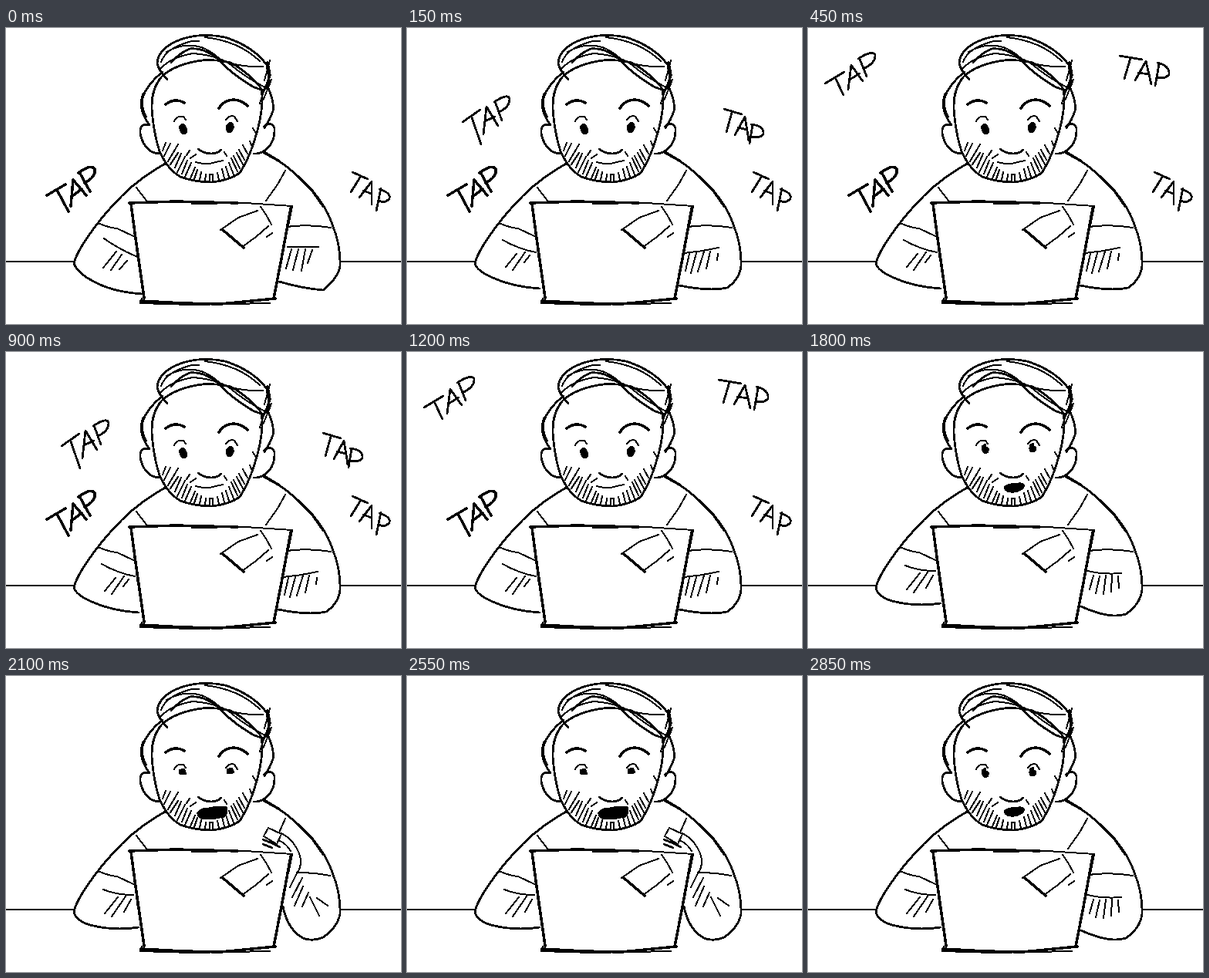
An HTML page that plays this animation: 512x384 px, repeating every 3 s.

```html
<!DOCTYPE html>
<html lang="en">
<head>
<meta charset="utf-8">
<title>Typing</title>
<style>
html, body { margin: 0; width: 100%; height: 100%; overflow: hidden; background: #fff; }
svg { display: block; width: 100%; height: 100%; }
path { fill: none; stroke: #000; stroke-width: 2.8; stroke-linecap: round; stroke-linejoin: round; shape-rendering: crispEdges; }
.thin { stroke-width: 2; }
.bold { stroke-width: 3.5; }
.ink { fill: #000; stroke-width: 1; }
g[id] { display: none; }
g.on { display: inline; }
</style>
</head>
<body>
<svg viewBox="0 0 512 384">
  <!-- table -->
  <path class="thin" d="M0 302.5H88M433 302.5H512"/>

  <!-- hair -->
  <path d="M209 67Q199 57 196 46Q197 28 221 17Q249 5 284 12Q321 24 338 48L342 73"/>
  <path class="thin" d="M201 44Q207 28 231 20Q240 16 250 17M208 31Q230 19 249 24Q261 26 277 40Q298 51 333 50"/>
  <path d="M214 45Q224 33 238 27Q256 25 273 39Q292 59 315 73Q324 79 335 81"/>
  <path class="thin" d="M201 52Q214 38 242 33Q270 35 288 45Q310 64 334 76M258 12Q302 17 329 43"/>
  <path class="bold" d="M339 45L342 61L337 78"/>
  <path class="thin" d="M342 42L335 68M344 67L334 92M336 76L329 98"/>
  <path d="M203 57Q184 71 175 94Q174 110 186 126M340 78Q348 96 346 108Q342 119 335 130"/>
  <path class="bold" d="M178 86L176 93L177 106L181 115"/>

  <!-- face -->
  <path d="M238 45Q212 52 201 64Q188 80 189 105Q191 135 199 160Q210 184 226 193Q244 200 268 200Q291 197 303 188Q314 171 321 149Q331 120 332 96Q333 84 329 76Q311 55 291 45Q264 38 238 45"/>
  <path d="M186 126Q173 122 174 137Q177 153 188 160Q195 164 200 162M334 128Q345 120 348 130Q349 145 340 155Q331 164 321 163"/>
  <path class="bold" d="M207 99Q219 90 231 97M276 104Q282 94 294 93Q305 93 313 101"/>
  <path d="M249 157Q257 163 266 163Q274 163 279 158"/>
  <path class="thin" d="M203 159L207 149M205 166L213 150M210 173L223 151M213 177L223 162M219 181L227 163M222 187L232 167M228 189L235 172M232 193L240 175M239 195L245 181M244 196L248 184M251 197L253 187M258 198L259 190M264 199V190H268V200M276 197L274 188M283 195L280 183M289 193L285 180M295 190L289 175M300 186L292 169M303 182L295 166M307 177L299 162M309 171L302 158M313 163L307 152M319 154L316 147M325 138L320 130M286 166L283 161M234 165L238 159M239 169L246 164"/>

  <!-- shoulders -->
  <path d="M208 175Q174 194 151 217Q121 247 100 280Q89 298 88 306M335 161Q363 176 385 199Q413 225 423 255Q434 282 433 309"/>
  <path class="bold" d="M335 162L353 172M379 193L397 211L411 231"/>
  <path class="thin" d="M169 207L182 224M119 253Q133 259 144 260L165 270"/>

  <!-- laptop -->
  <path class="bold" d="M160 227L220 225L300 227M162 228L168 273L179 350M369 234L358 294L347 351M175 354L230 357L278 358L349 351"/>
  <path class="thin" d="M241 228L310 227L371 231L366 256M176 351L174 357L240 359L342 357M163 238L171 302"/>
  <path class="thin" d="M278 262L301 246L326 237M306 284L324 271L340 257M330 232L337 242L344 255M338 271L345 266"/>
  <path class="bold" d="M281 262L308 285"/>

  <!-- lids, eyes and mouths -->
  <g id="lids"><path class="thin" d="M218 121Q222 113 230 115L233 119M285 119Q291 112 296 115L300 121"/></g>
  <g id="look"><path class="ink" d="M228 124Q233 125 235 133Q234 138 229 138Q224 134 225 127ZM290 122Q296 122 295 130Q293 136 288 136Q284 132 286 126Z"/></g>
  <g id="stare"><path class="ink" d="M225 122L230 119L231 123L234 125Q235 131 230 132Q225 131 225 122ZM288 120L292 118L293 122L296 124Q296 130 290 130Q285 128 288 120Z"/></g>
  <g id="gape"><path class="ink" d="M224 122L231 120L234 127H225ZM286 121L293 119L296 125Q291 128 286 126Z"/></g>
  <g id="shut"><path d="M219 122Q227 128 234 123M285 123Q292 128 299 122"/></g>
  <g id="smile"><path class="thin" d="M246 174Q260 178 272 174L281 172"/></g>
  <g id="flat"><path class="thin" d="M257 175Q267 176 276 173"/></g>
  <g id="small"><path class="ink" d="M262 173Q267 169 273 172Q272 177 266 177Q262 176 262 173Z"/></g>
  <g id="round"><path class="ink" d="M262 173Q267 169 273 172Q274 179 267 180Q262 179 262 173Z"/></g>
  <g id="open"><path class="ink" d="M254 175Q260 170 268 171Q278 168 281 173Q278 181 267 182Q255 183 254 175Z"/></g>
  <g id="wide"><path class="ink" d="M248 177Q252 171 263 171Q275 168 286 170Q289 178 283 183Q270 186 258 186Q247 185 248 177Z"/></g>

  <!-- left arm -->
  <g id="leftA">
    <path d="M88 306Q94 319 114 329Q137 342 176 345"/>
    <path class="thin" d="M127 273Q145 286 168 296M143 290L126 311M150 294L136 314M157 302L147 313"/>
  </g>
  <g id="leftB">
    <path d="M88 306Q91 315 111 324Q138 336 172 338"/>
    <path class="thin" d="M124 275Q145 287 167 291M142 293L128 310M153 291L137 314M159 295L152 304"/>
  </g>
  <g id="leftC">
    <path d="M88 306Q91 318 109 323Q140 331 172 326"/>
    <path class="thin" d="M126 277Q143 284 165 284M145 287L128 308M155 286L137 312M162 290L153 306"/>
  </g>

  <!-- right arm -->
  <g id="cuff"><path class="thin" d="M362 185L352 203L337 224M364 258Q391 254 421 259"/></g>
  <g id="rightA">
    <path d="M433 309Q430 325 411 340Q385 338 354 329"/>
    <path class="thin" d="M365 284L405 284M370 287L363 312M379 287L372 314M388 287L383 315M397 288L391 305"/>
  </g>
  <g id="rightB">
    <path d="M433 309Q431 326 415 337Q392 342 353 334"/>
    <path class="thin" d="M359 292Q382 290 404 285M366 293L361 315M375 292L368 318M385 290L377 316M393 290L388 312M403 293L402 301"/>
  </g>
  <g id="rightC">
    <path d="M433 309Q429 328 412 340Q386 347 353 339"/>
    <path class="thin" d="M358 297Q380 293 400 284M372 296L362 318M384 293L372 318M395 290L385 317M402 293L403 311"/>
  </g>
  <g id="rest">
    <path d="M433 309Q430 328 412 340Q391 347 354 330"/>
    <path class="thin" d="M363 284Q382 289 406 287M370 290L365 308M378 291L373 313M386 290L383 314M394 290L393 311M402 291L403 306"/>
  </g>
  <g id="lift">
    <path d="M433 309Q430 329 410 340Q386 347 372 331Q361 322 358 302"/>
    <path class="thin" d="M362 185L352 203L337 224M367 258Q394 255 420 259M370 270Q384 278 408 285M376 277L366 302M384 281L375 307M393 284L390 309M402 288L407 307"/>
  </g>
  <g id="grip">
    <path d="M433 309Q429 327 411 339Q397 345 385 340Q365 329 359 299"/>
    <path class="thin" d="M334 208L340 197L357 205L351 218ZM357 204Q374 213 381 233Q384 247 377 256Q373 264 368 274M353 213Q363 217 369 227"/>
    <path d="M333 212L345 217L355 222M333 218L345 223"/>
    <path class="thin" d="M362 185L354 203M377 255Q400 255 420 259M384 262L371 287M385 273L374 298M392 281L384 299M394 287L406 311M403 288L417 298"/>
  </g>

  <!-- sound lettering -->
  <g id="low"><path class="bold" d="M53 217L77 203M66 210L81 238M84 231L87 197L104 217M86 218L98 209M95 187L109 212M94 188Q110 176 115 183Q117 193 102 201"/>
    <path d="M449 187L469 196M460 192L447 213M458 220L474 199L474 229M463 211L474 215M486 208L480 237M484 209Q499 214 497 221Q492 228 483 224"/></g>
  <g id="mid"><path d="M72 122L95 106M84 116L96 151M99 138L103 102L118 127M101 121L114 115M114 95L123 120M113 96Q131 84 133 92Q133 103 119 109M411 105L434 112M421 110L414 135M425 139L438 115L443 146M429 129L441 132M448 125L444 150M446 125Q463 127 462 137Q458 144 447 141"/></g>
  <g id="high"><path d="M22 72L47 57M36 66L46 87M52 80L56 48L71 69M54 67L67 59M67 40L76 63M65 40Q83 28 87 35Q88 45 72 53M404 36L433 41M418 39L410 66M424 68L438 43L445 73M428 58L442 60M455 47L450 75M453 45Q469 49 468 60Q463 67 452 64"/></g>
  <g id="alert"><path class="ink" d="M379 53L397 54L391 105L377 111ZM376 125a10 10 0 1 0 20 0a10 10 0 1 0-20 0Z"/></g>
</svg>
<script>
const STEP = 150;
const armsA = 'leftA rightA cuff ', armsB = 'leftB rightB cuff ', armsC = 'leftC rightC cuff ';
const calm = 'lids look smile low ';
const shock = armsC + 'alert lids ';
const rest = 'leftC rest cuff lids stare open';
const lift = 'leftC lift lids gape wide';
const grip = 'leftC grip lids gape wide';
const blink = 'leftC grip shut wide';

const poses = [
  calm + armsA,
  calm + armsB + 'mid',
  calm + armsC + 'mid high',
  calm + armsB + 'high',
  calm + armsA + 'high',
  calm + armsA,
  calm + armsB + 'mid',
  calm + armsC + 'mid high',
  calm + armsB + 'high',
  shock + 'look flat',
  shock + 'stare small',
  shock + 'stare round',
  rest, lift, grip, blink, blink, grip, lift, rest
].map(p => p.trim().split(' '));

const groups = document.querySelectorAll('g[id]');
const start = performance.now();

function draw(now) {
  const step = Math.floor(Math.max(0, now - start) / STEP) % poses.length;
  for (const g of groups) g.classList.toggle('on', poses[step].includes(g.id));
  requestAnimationFrame(draw);
}
draw(start);
</script>
</body>
</html>
```
